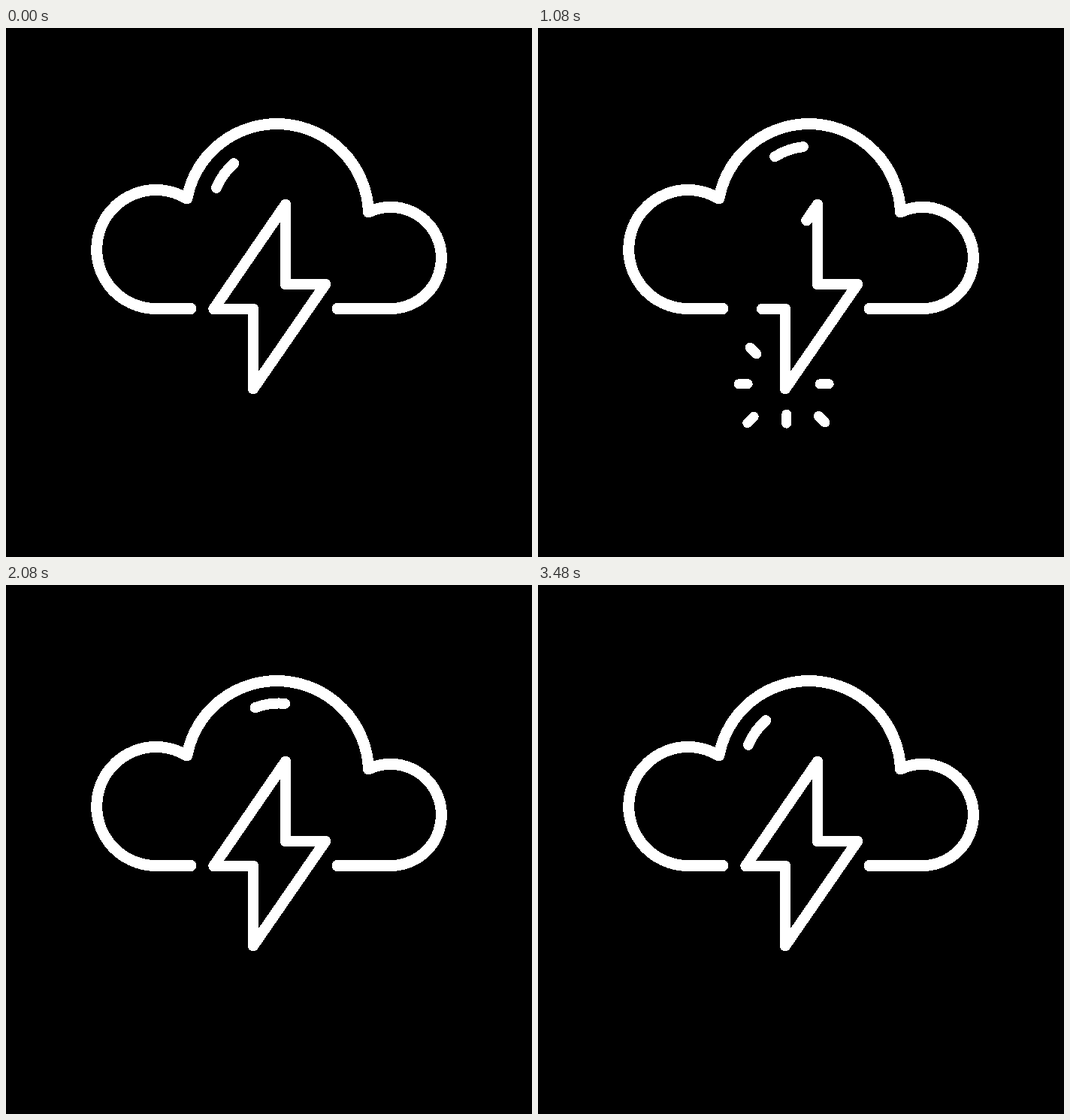
Animation of 700 by 704 pixels, one loop 4 s. Source, as an HTML page:

```html
<!DOCTYPE html>
<html lang="en">
<head>
<meta charset="utf-8">
<title>Thunder cloud</title>
<style>
  html, body { margin: 0; width: 100%; height: 100%; overflow: hidden; background: #000; }
  svg { display: block; width: 100%; height: 100%; }
</style>
</head>
<body>
<svg viewBox="0 0 700 704" fill="none" stroke="#fff" stroke-width="14.5" stroke-linecap="round" stroke-linejoin="round" shape-rendering="crispEdges">
  <path stroke-width="15" d="M246 373.5H199.5A79 79 0 1 1 240.7 227A122 122 0 0 1 482.5 245A67.6 67.6 0 1 1 513.3 373.5H441"/>
  <path id="shine" stroke-width="14"/>
  <path id="bolt" d="M425 341L329 480V374H276.5L372 235V341Z"/>
  <g id="sparks" stroke-width="13" transform="translate(330.7 473.7)"></g>
</svg>
<script>
const LOOP = 4000, STEP = 40, MOVE_END = 3480;
const shine = document.getElementById('shine');
const bolt = document.getElementById('bolt');
const sparks = document.getElementById('sparks');
const boltLength = bolt.getTotalLength();

const clamp = x => Math.min(1, Math.max(0, x));
const progress = (t, from, to) => clamp((t - from) / (to - from));
const smooth = x => x * x * (3 - 2 * x);
const easeInOut = (x, power) => x ** power / (x ** power + (1 - x) ** power);

// Each spark: direction in degrees and travel distance.
const rays = [[0, 35], [45, 19], [90, 39], [135, 18], [180, 28], [225, 23]].map(([angle, travel]) => {
  const line = document.createElementNS('http://www.w3.org/2000/svg', 'line');
  line.setAttribute('transform', `rotate(${angle})`);
  sparks.append(line);
  return { line, travel };
});

function drawShine(t) {
  const half = MOVE_END / 2;
  const start = 22.7 + 52 * smooth(clamp(1 - Math.abs(t - half) / half));
  const point = deg => {
    const a = deg * Math.PI / 180;
    return `${363 - 90 * Math.cos(a)} ${247.5 - 90 * Math.sin(a)}`;
  };
  shine.setAttribute('d', `M${point(start)}A90 90 0 0 1 ${point(start + 25.7)}`);
}

// A gap runs once around the bolt, widest halfway.
function drawBolt(t) {
  const u = progress(t, 270, 1730);
  const gap = u > 0 && u < 1 ? 170 * Math.sin(Math.PI * u) ** 2.2 : 0;
  const gapEnd = boltLength * easeInOut(u, 1.7) + gap / 2;
  bolt.style.strokeDasharray = gap ? `${boltLength - gap} ${gap}` : 'none';
  bolt.style.strokeDashoffset = -gapEnd;
}

function drawSparks(t) {
  const from = 880, to = 1800;
  sparks.style.display = t >= from && t < to - STEP ? '' : 'none';
  const left = ((to - t) / 720) ** 2;
  const length = 12 * left * progress(t, from - STEP, from + 160);
  for (const { line, travel } of rays) {
    const front = 91.5 - travel * left;
    line.setAttribute('x1', front - length);
    line.setAttribute('x2', front);
  }
}

function frame(now) {
  const t = Math.min(MOVE_END, Math.floor(now % LOOP / STEP) * STEP);
  drawShine(t);
  drawBolt(t);
  drawSparks(t);
  requestAnimationFrame(frame);
}
frame(0);
</script>
</body>
</html>
```
